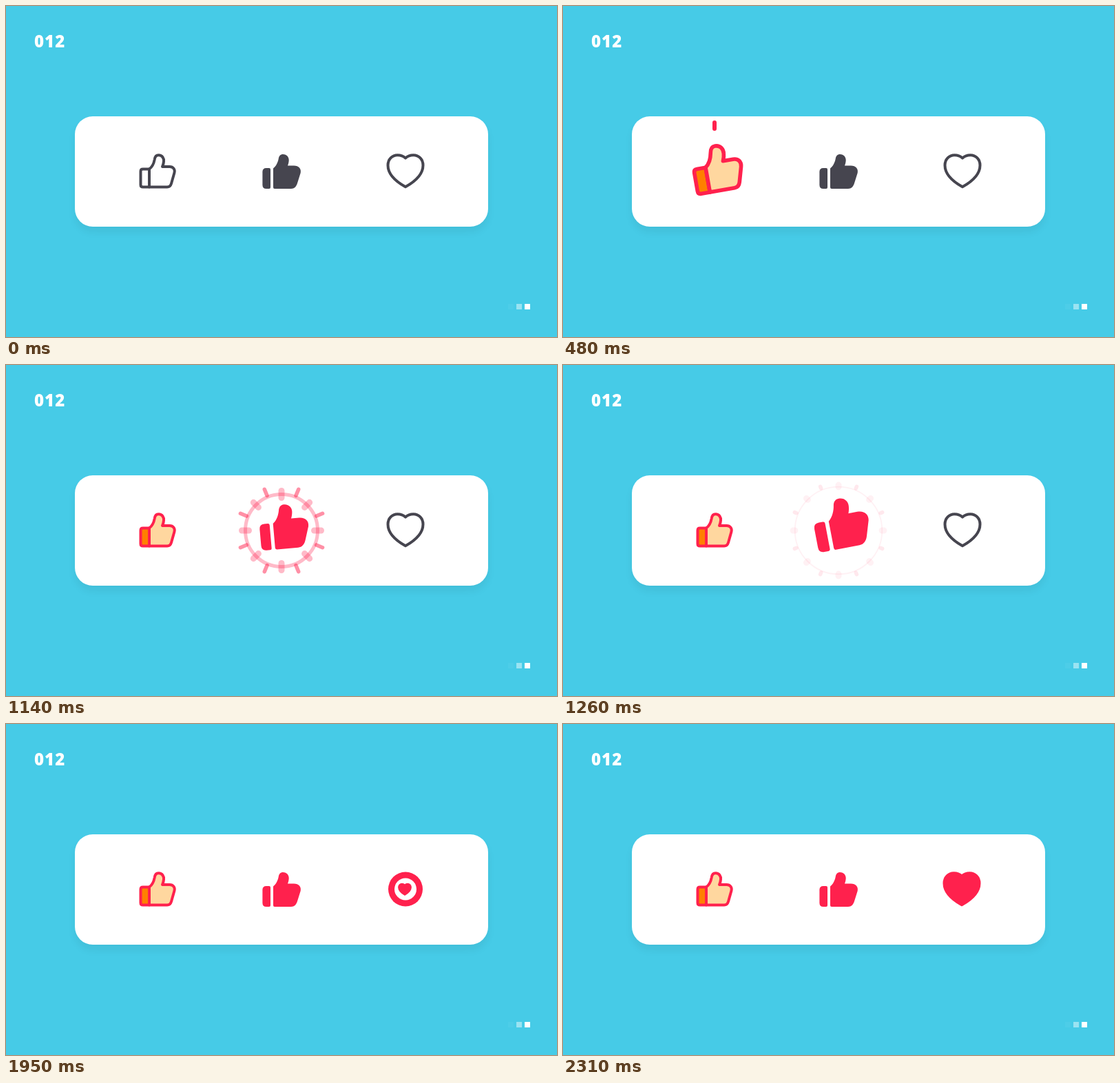
Recreate the animation shown at these times as an HTML page with a canvas. Size 800 by 480 pixels, loop 3000 ms.

```html
<!DOCTYPE html>
<html lang="en">
<head>
<meta charset="utf-8">
<title>Like buttons</title>
<style>
  html, body { margin: 0; width: 100%; height: 100%; overflow: hidden; background: #46cbe7; }
  body > * { position: absolute; }
  .number { left: 41px; top: 34px; color: #fff; font: 800 24px/33px "Open Sans", sans-serif; letter-spacing: 1px; }
  .card { left: 100px; top: 160px; width: 600px; height: 160px; border-radius: 26px; background: #fff; box-shadow: 0 8px 12px rgba(0, 0, 0, .06); }
  .dots { left: 753px; top: 432px; width: 8px; height: 8px; background: #fff; box-shadow: -12px 0 rgba(255, 255, 255, .45), -24px 0 rgba(255, 255, 255, .04); }
  canvas { left: 0; top: 0; }
</style>
</head>
<body>
<div class="number">012</div>
<div class="card"></div>
<div class="dots"></div>
<canvas width="800" height="480"></canvas>
<script>
const ctx = document.querySelector('canvas').getContext('2d');
const DARK = '#46454f', RED = '#ff214d', SKIN = '#ffd79f', CUFF = '#ff8000';
const LOOP = 3000, STEP = 30;

const linePalm = new Path2D('M-12-3.5C-8-6.5-5.3-12-4.4-17C-3.8-21.5-1.5-23.7 1.5-23.7C7-23.7 9.5-19 9-14.5C8.8-11.5 8-9.3 7-7H17.5C22.8-7 25.8-3 24.4 2L20 17.5C19 21 17 22.5 14 22.5H-12Z');
const lineCuff = new Path2D('M-12-3.5H-21.2Q-24.5-3.5-24.5-.2V19.2Q-24.5 22.5-21.2 22.5H-12Z');
const solidPalm = new Path2D('M-12-4.5C-7.5-8-5-14-4.2-19C-3.5-23-1-25 2-25C8-25 11-20.5 10.7-16C10.5-13 9.8-10.5 9-8.5H18C25-8.5 29-4 27.7 2L23 17C21.5 22 18.5 25 14 25H-10Q-12 25-12 23Z');
const solidCuff = new Path2D('M-22-5H-18Q-16-5-16-3V23Q-16 25-18 25H-22Q-27.6 25-27.6 19.5V.5Q-27.6-5-22-5Z');
const heart = new Path2D('M0-19.5C-3-22.3-7-23.8-11.5-23.8C-19.5-23.8-25.5-17.5-25.5-9C-25.5 5-14 14.5 0 22.3C14 14.5 25.5 5 25.5-9C25.5-17.5 19.5-23.8 11.5-23.8C7-23.8 3-22.3 0-19.5Z');

// Linear interpolation through time/value pairs, held at both ends.
function track(t, ...keys) {
  if (t <= keys[0]) return keys[1];
  for (let i = 2; i < keys.length; i += 2) {
    if (t <= keys[i]) {
      const k = (t - keys[i - 2]) / (keys[i] - keys[i - 2]);
      return keys[i - 1] + (keys[i + 1] - keys[i - 1]) * k;
    }
  }
  return keys[keys.length - 1];
}

function place(x, draw) {
  ctx.save();
  ctx.translate(x, 240);
  draw();
  ctx.restore();
}

function shape(path, fill, stroke) {
  if (fill) { ctx.fillStyle = fill; ctx.fill(path); }
  if (stroke) { ctx.strokeStyle = stroke; ctx.lineWidth = 4; ctx.stroke(path); }
}

function line(x1, y1, x2, y2, width) {
  ctx.strokeStyle = RED;
  ctx.lineWidth = width;
  ctx.beginPath();
  ctx.moveTo(x1, y1);
  ctx.lineTo(x2, y2);
  ctx.stroke();
}

function disc(x, y, r, color) {
  ctx.fillStyle = color;
  ctx.beginPath();
  ctx.arc(x, y, r, 0, 2 * Math.PI);
  ctx.fill();
}

function pop(t, px, py, peak) {
  const scale = track(t, -30, 1, 0, .94, 60, .83, 150, 1.28, 225, peak, 300, 1.4, 420, 1);
  const turn = track(t, 60, 0, 150, -5, 225, -12, 300, -10, 420, 0);
  ctx.translate(px, py);
  ctx.rotate(turn * Math.PI / 180);
  ctx.scale(scale, scale);
  ctx.translate(-px, -py);
}

function outlineThumb(t) {
  if (t >= 210 && t < 390) {
    line(0, track(t, 210, -50, 300, -71, 390, -72), 0, track(t, 210, -46, 300, -62, 390, -72), 6);
  }
  pop(t, -13, 2, 1.54);
  const on = t >= 90;
  shape(lineCuff, on && CUFF, on ? RED : DARK);
  shape(linePalm, on && SKIN, on ? RED : DARK);
}

function rays(offset, inner, outer, width, alpha) {
  ctx.globalAlpha = alpha;
  for (let i = 0; i < 8; i++) {
    const a = (i + offset) * Math.PI / 4, c = Math.cos(a), s = Math.sin(a);
    line(c * inner, s * inner, c * outer, s * outer, width);
  }
}

function solidThumb(t) {
  if (t >= 90 && t < 300) {
    const fade = track(t, 90, 1.4, 150, 1, 300, 0);
    ctx.globalAlpha = .31 * fade;
    ctx.strokeStyle = RED;
    ctx.lineWidth = track(t, 90, 9, 150, 5, 300, 1);
    ctx.beginPath();
    ctx.arc(0, 0, track(t, 90, 30, 150, 52.5, 300, 66), 0, 2 * Math.PI);
    ctx.stroke();
    rays(0, track(t, 90, 30, 150, 47.5, 300, 67), track(t, 90, 36, 150, 57.5, 300, 68), 9, .31 * fade);
    rays(.5, track(t, 90, 34, 150, 54.8, 300, 69), track(t, 90, 40, 150, 64.5, 300, 70), 5.5, .5 * fade);
    ctx.globalAlpha = 1;
  }
  pop(t, -18, 13, 1.5);
  const color = t >= 90 ? RED : DARK;
  shape(solidCuff, color);
  shape(solidPalm, color);
}

function burstHeart(t) {
  if (t < 90) {
    const s = track(t, -30, 1, 0, .94, 90, .4);
    ctx.scale(s, s);
    shape(heart, null, DARK);
    return;
  }
  if (t < 210) {
    disc(0, -.5, track(t, 60, 4, 150, 25, 210, 31), RED);
    disc(0, -.5, track(t, 90, 0, 150, 16, 210, 31), '#fff');
  }
  if (t >= 180 && t < 480) {
    const r = track(t, 180, 32, 300, 55, 480, 64), size = track(t, 180, 4, 300, 3.5, 480, 0);
    for (let i = 0; i < 7; i++) {
      const a = i * 2 * Math.PI / 7;
      disc(r * Math.sin(a), -r * Math.cos(a), size, RED);
    }
  }
  const s = track(t, 90, 0, 150, .36, 270, 1.18, 360, .94, 435, 1.03, 510, 1);
  ctx.translate(-1, 0);
  ctx.scale(s, s);
  shape(heart, RED, RED);
}

function draw(now) {
  const t = Math.floor(now % LOOP / STEP) * STEP;
  ctx.clearRect(0, 0, 800, 480);
  ctx.lineCap = ctx.lineJoin = 'round';
  place(220, () => outlineThumb(t - 180));
  place(400, () => solidThumb(t - 990));
  place(580, () => burstHeart(t - 1800));
}

const start = performance.now();
function frame() {
  draw(performance.now() - start);
  requestAnimationFrame(frame);
}
frame();
</script>
</body>
</html>
```
